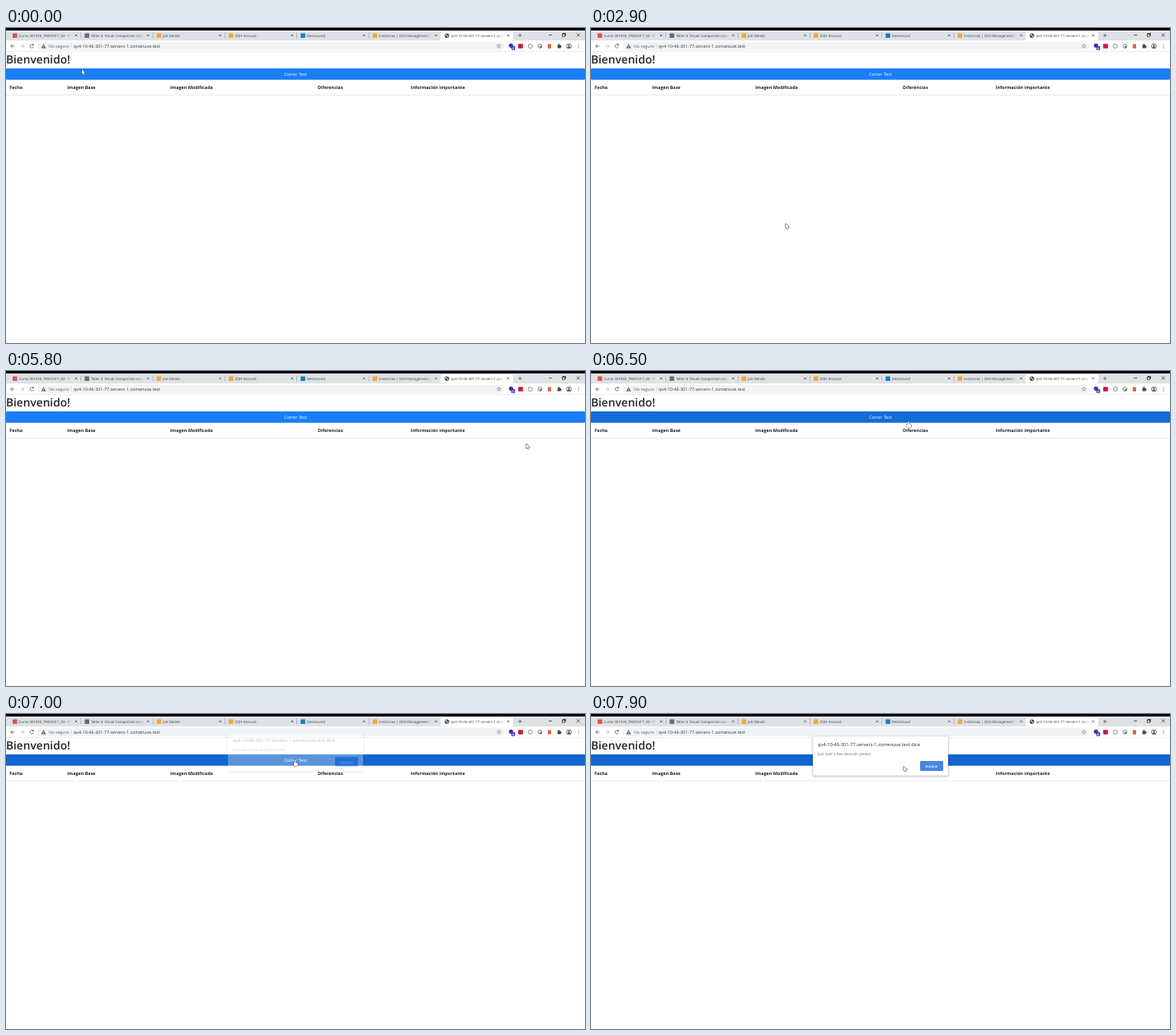
An HTML page with a canvas for the animation above (8 s loop, 702 px wide and 382 px high).

```html
<!DOCTYPE html>
<html lang="es">
<head>
<meta charset="utf-8">
<title>Bienvenido</title>
<style>
html, body { margin: 0; width: 100%; height: 100%; overflow: hidden; background: #fff; }
canvas { display: block; width: 702px; height: 382px; }
</style>
</head>
<body>
<canvas id="stage" width="702" height="382"></canvas>
<script>
const W = 702, H = 382, LOOP = 8000, STEP = 100;
const HOVER = 6500, PRESS = 6900, POPUP = 7000;
const stage = document.getElementById('stage').getContext('2d');
const layer = new OffscreenCanvas(W, H).getContext('2d');
let ctx = stage;

const SANS = '"Open Sans", "Noto Sans", sans-serif';
const HOST = 'qv4-10-46-301-77.servers-1.zomenuve.test';
const INK = '#45484c', GREY = '#5f6368', ORANGE = '#f0a83c';

const smooth = k => k * k * (3 - 2 * k);
const easeOut = k => 1 - (1 - k) ** 3;

// pointer moves: start, end, x, y, easing
const MOVES = [
  [300, 800, 93, 64, smooth],
  [1800, 2700, 450, 83, smooth],
  [2800, 2900, 236, 237, smooth],
  [3100, 3400, 188, 266, smooth],
  [4300, 4600, 193, 258, smooth],
  [4600, 5200, 445, 193, smooth],
  [5200, 6100, 638, 84, easeOut],
  [6100, 6600, 355.5, 58.7, smooth],
  [6600, 7000, 350.6, 56, smooth],
  [7400, 7900, 379, 63, smooth]
];

const TABS = [
  ['Curso 301030_TAVE5317_02 - P', '#d9574a'],
  ['Taller 4: Visual Comparison Lesson', '#6a6d72'],
  ['Job Details', ORANGE],
  ['ZQH Account', ORANGE],
  ['Deskround', '#1b7fb5'],
  ['Instancias | QV4 Management Co', ORANGE],
  [HOST]
];

function rect(x, y, w, h, color, r = 0) {
  ctx.fillStyle = color;
  ctx.beginPath();
  ctx.roundRect(x, y, w, h, r);
  ctx.fill();
}

function dot(x, y, r, color, from = 0, to = Math.PI * 2) {
  ctx.fillStyle = color;
  ctx.beginPath();
  ctx.arc(x, y, r, from, to);
  ctx.fill();
}

function ring(x, y, r, color, from = 0, to = Math.PI * 2) {
  ctx.strokeStyle = color;
  ctx.lineWidth = 0.7;
  ctx.beginPath();
  ctx.arc(x, y, r, from, to);
  ctx.stroke();
}

function trace(points, closed) {
  ctx.beginPath();
  points.forEach(([x, y]) => ctx.lineTo(x, y));
  if (closed) ctx.closePath();
}

function line(points, color, width = 0.7) {
  ctx.strokeStyle = color;
  ctx.lineWidth = width;
  trace(points);
  ctx.stroke();
}

function text(str, x, y, size, color, weight = 400, align = 'left') {
  ctx.font = `${weight} ${size}px ${SANS}`;
  ctx.fillStyle = color;
  ctx.textAlign = align;
  ctx.fillText(str, x, y);
}

function cross(x, y, r, color) {
  line([[x - r, y - r], [x + r, y + r]], color);
  line([[x - r, y + r], [x + r, y - r]], color);
}

function globe(x, y) {
  dot(x, y, 2.7, INK);
  dot(x - 0.9, y - 0.8, 0.9, '#fff');
  dot(x + 0.9, y + 0.9, 0.8, '#fff');
}

function drawTab([label, color], i) {
  const x = 4 + i * 87.3, last = TABS.length - 1;
  const back = i === last ? '255,255,255' : '222,225,230';
  if (i === last) {
    rect(x - 1, 4, 87, 12, '#fff', [3, 3, 0, 0]);
    globe(x + 6.8, 9.2);
  } else {
    rect(x + 4, 6.4, 5.6, 5.6, color, 0.6);
  }
  text(label, x + 11.6, 10.8, 4.3, '#3c4043');
  const fade = ctx.createLinearGradient(x + 68, 0, x + 77, 0);
  fade.addColorStop(0, `rgba(${back},0)`);
  fade.addColorStop(1, `rgb(${back})`);
  rect(x + 68, 5, 80, 9, fade);
  cross(x + 81, 9, 1.3, INK);
  if (i < last - 1) rect(x + 86.6, 5.5, 0.5, 7, '#8d9096');
}

function drawTabStrip() {
  rect(0, 0, W, 15.5, '#dee1e6');
  rect(0, 0, W, 3, '#000');
  TABS.forEach(drawTab);
  rect(615, 4, 87, 11, '#dee1e6');
  line([[621, 9], [625.4, 9]], INK);
  line([[623.2, 6.8], [623.2, 11.2]], INK);
  line([[658, 8.5], [662, 8.5]], '#222');
  ctx.strokeRect(675.6, 6.4, 2.8, 2.8);
  rect(674.6, 7.4, 2.8, 2.8, '#dee1e6');
  ctx.strokeRect(674.6, 7.4, 2.8, 2.8);
  cross(693.8, 8.5, 1.9, '#222');
}

function arrow(x, dir, color) {
  line([[x - 2.3 * dir, 22], [x + 2.3 * dir, 22]], color);
  line([[x, 19.7], [x - 2.3 * dir, 22], [x, 24.3]], color);
}

function star(x, y) {
  const points = Array.from({ length: 11 }, (_, i) => {
    const a = i * Math.PI / 5 - Math.PI / 2, r = i % 2 ? 1.2 : 2.6;
    return [x + r * Math.cos(a), y + r * Math.sin(a)];
  });
  line(points, GREY, 0.5);
}

function warning(x, y) {
  ctx.fillStyle = GREY;
  trace([[x, y - 2.8], [x + 2.9, y + 2.4], [x - 2.9, y + 2.4]], true);
  ctx.fill();
  rect(x - 0.3, y - 1, 0.6, 1.7, '#fff');
  rect(x - 0.3, y + 1.1, 0.6, 0.6, '#fff');
}

function drawExtensions() {
  const slot = i => 612.3 + i * 11.7;
  dot(slot(0), 21.3, 2.6, '#3f32a8');
  rect(slot(0) + 0.4, 22, 4.5, 4.8, '#4a35c6', 0.8);
  text('6', slot(0) + 2.6, 25.9, 3.6, '#fff', 700, 'center');
  rect(slot(1) - 3, 19.2, 5.8, 5.6, '#d2143c', 1);
  ring(slot(2), 22, 2.5, GREY);
  ring(slot(3), 22, 2.4, INK);
  dot(slot(3) + 0.6, 22.7, 1, INK);
  rect(slot(4) - 2.2, 19.4, 4, 5.3, '#d6653d', 0.6);
  rect(slot(5) - 2.2, 20.5, 4, 4, INK, 0.5);
  dot(slot(5) - 0.4, 20.2, 1, INK);
  dot(slot(5) + 1.9, 22.4, 1, INK);
  ring(slot(6), 22, 3, INK);
  dot(slot(6), 21, 1.1, INK);
  dot(slot(6), 24.3, 2, INK, Math.PI, 0);
  for (let y = 20; y <= 24; y += 2) dot(slot(7), y, 0.5, INK);
}

function drawToolbar() {
  rect(0, 15.3, W, 13, '#fff');
  rect(38, 16.8, 566, 10.2, '#f1f3f4', 5);
  arrow(8, 1, INK);
  arrow(19.7, -1, '#b4b7bb');
  ring(31.4, 22, 2.1, INK, 0.3, 5.6);
  rect(32.2, 19.4, 1.6, 1.6, INK);
  warning(45.6, 22);
  text('No seguro', 52, 23.8, 5.1, GREY);
  rect(78.8, 19, 0.4, 6, '#b5b8bc');
  text(HOST, 82, 23.8, 5.3, '#35383c');
  star(597.6, 22);
  drawExtensions();
  rect(0, 28.2, W, 0.5, '#d8dade');
}

function drawPage(t) {
  text('Bienvenido!', 0, 43.2, 13.7, '#212529', 600);
  const blue = t >= PRESS ? '#1266cf' : t >= HOVER ? '#146cd9' : '#1a7ef6';
  rect(0, 49, W, 13.8, blue, 1);
  text('Correr Test', 351, 58.2, 5.4, '#fff', 400, 'center');
  const columns = { 'Fecha': 4.3, 'Imagen Base': 74, 'Imagen Modificada': 199,
    'Diferencias': 378, 'Información importante': 490.6 };
  for (const label in columns) text(label, columns[label], 74.3, 5.45, '#212529', 700);
  rect(0, 80.7, W, 0.8, '#d9dde1');
}

function paintDialog() {
  ctx.shadowColor = 'rgba(0,0,0,0.42)';
  ctx.shadowBlur = 3;
  ctx.shadowOffsetY = 0.6;
  rect(269, 27.3, 164, 47.4, '#fff', 1.2);
  ctx.shadowColor = 'transparent';
  text(HOST + ' dice', 275, 39.4, 5.65, '#2b2d31');
  text('Just wait a few seconds please', 275, 49.5, 4.55, '#6a6d72');
  rect(399, 57, 28, 12, '#4685e3', 1.3);
  text('Aceptar', 413, 64.5, 4.2, '#fff', 600, 'center');
}

// The dialog is painted opaque on its own layer, then faded in as a whole.
function drawDialog(t) {
  if (t < POPUP) return;
  const k = easeOut(Math.min(1, (t - POPUP) / 200));
  stage.globalAlpha = 0.3 + 0.7 * k;
  stage.drawImage(layer.canvas, 0, -5 * (1 - k));
  stage.globalAlpha = 1;
}

function pointerAt(t) {
  let x = 92, y = 50;
  for (const [from, to, tx, ty, ease] of MOVES) {
    const k = ease(Math.min(1, Math.max(0, (t - from) / (to - from))));
    x += (tx - x) * k;
    y += (ty - y) * k;
  }
  return [x, y];
}

function arrowShape() {
  trace([[0, 0], [0, 6], [1.4, 4.8], [2.4, 7], [3.3, 6.6], [2.4, 4.5], [4.3, 4.4]], true);
}

function handShape() {
  ctx.beginPath();
  ctx.roundRect(-0.7, 0, 1.4, 5, 0.7);
  ctx.roundRect(-1.8, 3, 5, 4.4, 1.2);
}

function drawPointer(t) {
  ctx.save();
  ctx.translate(...pointerAt(t));
  if (t >= HOVER && t < POPUP + 200) handShape();
  else arrowShape();
  ctx.lineJoin = 'round';
  ctx.lineWidth = 0.9;
  ctx.fillStyle = '#fff';
  ctx.strokeStyle = '#26282c';
  ctx.stroke();
  ctx.fill();
  ctx.restore();
}

function draw(t) {
  rect(0, 0, W, H, '#fff');
  drawTabStrip();
  drawToolbar();
  drawPage(t);
  drawDialog(t);
  drawPointer(t);
}

stage.textRendering = layer.textRendering = 'geometricPrecision';
ctx = layer;
paintDialog();
ctx = stage;

const start = performance.now();
function tick() {
  const t = (performance.now() - start) % LOOP;
  draw(Math.floor(t / STEP) * STEP);
  requestAnimationFrame(tick);
}
tick();
</script>
</body>
</html>
```
